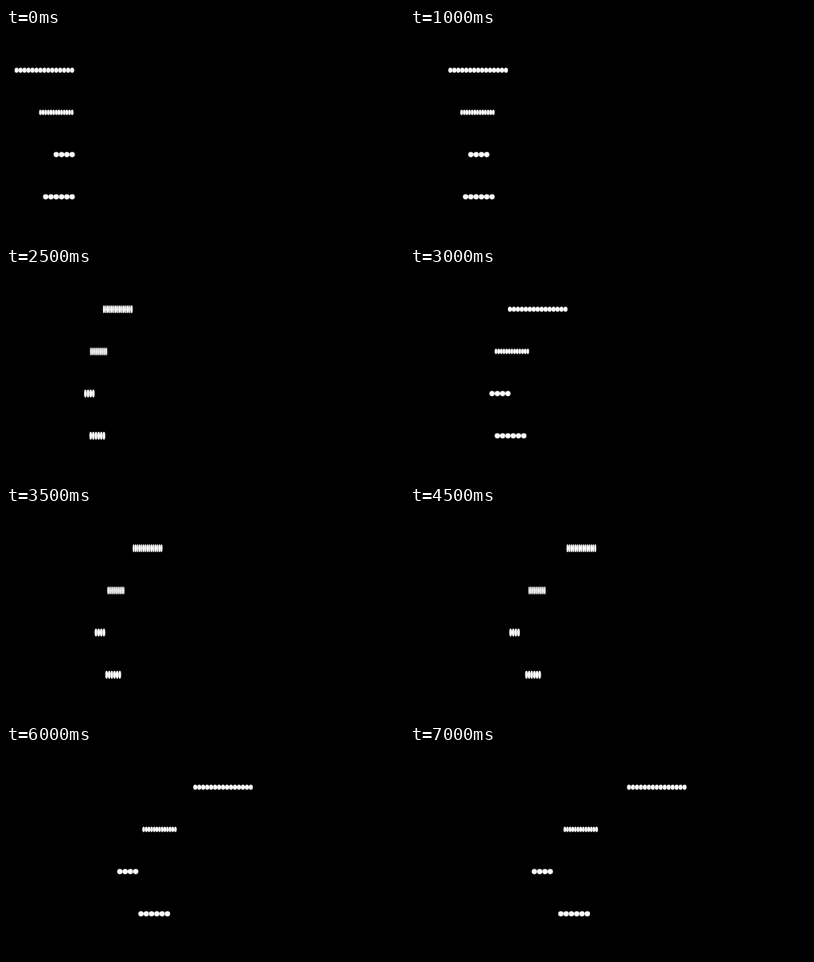
Recreate the animation shown at these times as an HTML page with a canvas. Size 500 px wide and 266 px high, loop 7.5 s.

```html
<!DOCTYPE html>
<html>
<head>
<meta charset="utf-8">
<style>
  html, body { margin: 0; height: 100%; overflow: hidden; background: #000; }
  canvas { display: block; }
</style>
</head>
<body>
<canvas width="500" height="266"></canvas>
<script>
const ctx = document.querySelector('canvas').getContext('2d');
const STEP = 500, STEPS = 15, START = 25, ROW_GAP = 16;
// The scene is 80 units high.
const SCALE = 266 / 80;
const worms = [
  { count: 15, width: 1.5 },
  { count: 13, width: 1 },
  { count: 4, width: 2 },
  { count: 6, width: 2 }
];

function drawWorm({ count, width }, row, step) {
  const squeezed = step % 2 === 1;
  // The head moves half a body length each time the worm stretches.
  const head = START + Math.floor(step / 2) * count * width / 2;
  const gap = squeezed ? width / 2 : width;
  const ry = squeezed ? 1.5 : 1;
  for (let i = 0; i < count; i++) {
    ctx.beginPath();
    ctx.ellipse(head - i * gap, ROW_GAP * (row + 1), gap / 2, ry, 0, 0, 2 * Math.PI);
    ctx.fill();
  }
}

function frame() {
  const step = Math.floor(performance.now() / STEP) % STEPS;
  ctx.setTransform(1, 0, 0, 1, 0, 0);
  ctx.fillStyle = '#000';
  ctx.fillRect(0, 0, 500, 266);
  ctx.scale(SCALE, SCALE);
  ctx.fillStyle = '#fff';
  worms.forEach((worm, row) => drawWorm(worm, row, step));
  requestAnimationFrame(frame);
}
frame();
</script>
</body>
</html>
```
